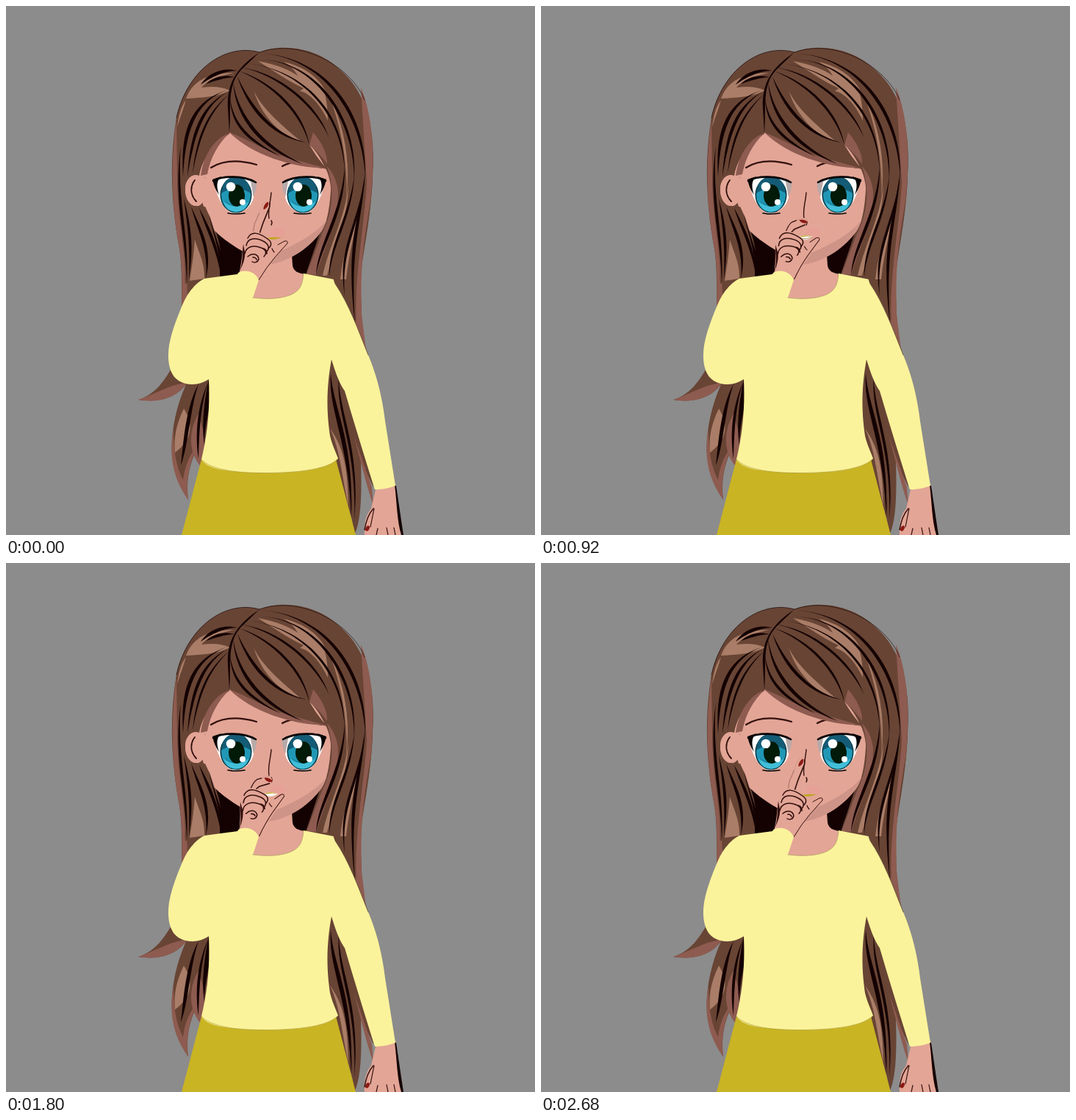
These frames come from a looping animation (720x720 px, 3 s). An HTML page:

```html
<!DOCTYPE html>
<html lang="en">
<head>
<meta charset="utf-8">
<title>Finger bend</title>
<style>
html, body { margin: 0; width: 100%; height: 100%; overflow: hidden; background: #8c8c8c; }
svg { display: block; width: 100vw; height: 100vh; }
</style>
</head>
<body>
<svg id="stage" viewBox="0 0 720 720"></svg>
<script>
const C = {
  hair: '#684434', dark: '#140203', light: '#a97d67', rose: '#8e5b50',
  skin: '#e3a596', shade: '#cf9488', line: '#32100d', top: '#fbf39b',
  skirt: '#c9b423', nail: '#8b1a14', lip: '#bfa51f'
};
const stage = document.getElementById('stage');

function add(tag, attrs, parent = stage) {
  const el = document.createElementNS('http://www.w3.org/2000/svg', tag);
  for (const key in attrs) el.setAttribute(key, attrs[key]);
  parent.appendChild(el);
  return el;
}
const fill = (d, color, parent) => add('path', { d, fill: color }, parent);
const stroke = (d, width, color = C.line, parent) => add('path', {
  d, fill: 'none', stroke: color, 'stroke-width': width,
  'stroke-linecap': 'round', 'stroke-linejoin': 'round'
}, parent);
const oval = (cx, cy, rx, ry, color, parent) =>
  add('ellipse', { cx, cy, rx, ry, fill: color }, parent);

// Tapered lock: one cubic there, a shifted cubic back.
function lock(x1, y1, x2, y2, x3, y3, x4, y4, w, color = C.dark, v = 0) {
  fill(`M${x1} ${y1}C${x2} ${y2} ${x3} ${y3} ${x4} ${y4}` +
    `C${x3 + w} ${y3 + v} ${x2 + w} ${y2 + v} ${x1} ${y1}Z`, color);
}

function backHair() {
  fill('M345 63C300 50 245 88 232 152C222 210 225 270 235 325C240 350 239 380 239 410' +
    'L228 488C215 512 202 529 180 536C205 540 230 535 245 515C228 553 223 592 227 620' +
    'C231 642 239 658 248 672C245 645 249 628 258 606L272 630L450 630L471 700' +
    'L474 720C481 706 485 680 483 620L500 655L497 500C483 453 480 405 482 372' +
    'C487 325 498 285 499 225C501 155 480 95 430 69C400 54 367 54 345 63Z', C.hair);
  fill('M234 148C223 210 225 275 236 330C241 360 239 390 239 412L247 395C247 345 232 295 231 245Z', C.rose);
  fill('M483 112C503 160 501 230 496 270C488 320 482 350 483 400C483 440 491 475 500 502' +
    'L476 432C471 370 488 300 491 240C493 190 490 140 483 112Z', C.rose);
  fill('M180 536C203 528 220 517 239 514L250 508C235 533 209 541 180 536Z', C.rose);
  fill('M228 575C220 615 230 648 248 672C244 645 250 625 259 600C243 620 242 641 241 645C231 625 228 605 228 575Z', C.rose);
  fill('M262 555C247 580 249 610 266 628L272 590Z', C.rose);
  lock(242, 548, 231, 570, 228, 590, 230, 608, 25, C.light);
  lock(262, 515, 244, 545, 241, 600, 238, 625, 7);
  lock(275, 512, 258, 550, 258, 590, 262, 616, 5);
  fill('M276 508L277 545C271 573 269 590 271 602C265 575 270 535 276 508Z', C.dark);
  fill('M473 584L498 655L500 680C488 645 482 615 473 584Z', C.rose);
  lock(442, 500, 438, 550, 466, 590, 470, 695, 8);
  lock(453, 505, 448, 555, 478, 600, 474, 700, 5);
  lock(441, 575, 455, 605, 457, 640, 466, 680, 8, C.light);
  fill('M284 303L328 335L320 368L294 370C294 340 291 320 284 303Z', C.dark);
  fill('M388 342L428 306L408 366L388 361Z', C.dark);
}

function face() {
  fill('M344 335L389 338L390 353C391 361 398 364 407 365L402 404L334 404Z', C.skin);
  fill('M304 170C280 186 266 204 262 232C263 262 274 292 284 306C300 322 326 338 358 351' +
    'C388 347 417 323 429 307C441 291 443 250 443 215L415 185Z', C.skin);
  fill('M437 291C418 314 388 327 368 336L357 352C388 348 416 326 429 307Z', C.shade);
  oval(258, 251, 15, 22, C.skin);
  oval(269, 250, 9, 18, C.skin);
  stroke('M257 236C250 246 251 258 259 266', 1.8);
  stroke('M270 233C272 236 273 239 273 241', .8, C.rose);
  stroke('M279 220C297 209 320 210 341 216', 2.3);
  stroke('M376 218C392 209 412 212 429 220', 2.3);
  stroke('M361 254C360 268 356 276 358 289', 1.4);
  stroke('M361 292Q363 295 361 298', 1.4);
  add('ellipse', { cx: 370, cy: 309, rx: 10, ry: 7, fill: '#e89e94', opacity: .7 });
}

function eye(cx, flip) {
  const g = add('g', { transform: `translate(${cx} 257) scale(${flip} 1)` });
  fill('M4 -20C18 -24 25 -20 28 -17C29 -8 25 1 20 8Z', '#b8a9a9', g);
  fill('M-30 -19C-22 -24 8 -26 20 -18L24 4C20 18 9 25 -4 25C-16 22 -26 5 -30 -19Z', '#fff', g);
  oval(0, 0, 21.5, 24.5, '#07313b', g);
  oval(0, .5, 20, 23, '#2097b5', g);
  fill('M-20 -2C-18 -20 -10 -24 0 -24C12 -24 20 -15 20 -2C10 -10 -9 -10 -20 -2Z', '#145b75', g);
  fill('M-17 9C-8 18 9 18 17 9C13 28 -12 28 -17 9Z', '#42bed8', g);
  stroke('M-14 9C-7 17 7 17 14 9', 1, '#187792', g);
  stroke('M-31 -19C-20 -26 10 -27 27 -17', 2.6, '#050304', g);
  fill('M-32 -21L-20 -25L-24 -20C-27 -13 -25 -6 -23 0C-28 -7 -30 -13 -32 -21Z', '#050304', g);
  stroke('M-11 25Q0 27 12 25', 1.7, '#050304', g);
  oval(cx + 1, 258, 11, 15, '#021a08');
  oval(cx - 7, 246, 6.3, 6.3, '#fff');
  oval(cx + 9, 267, 4, 4, '#fff');
}

function frontHair() {
  // left side
  fill('M345 63C300 50 247 85 232 152C225 205 227 280 239 330L244 378L297 370' +
    'C294 342 288 318 278 288L271 273C253 276 243 262 244 247C245 234 255 228 263 231' +
    'C267 207 284 187 304 174L309 100Z', C.hair);
  oval(258, 251, 14, 21, C.skin);
  oval(268, 250, 8, 17, C.skin);
  stroke('M257 237C250 246 251 258 259 266', 1.8);
  fill('M304 173C281 181 268 207 265 231L274 229C278 207 288 188 304 173Z', C.rose);
  fill('M232 155C224 210 226 275 237 330L243 375C247 345 233 290 233 235Z', C.rose);
  fill('M245 126C253 103 274 91 310 91C288 96 272 103 266 111C282 109 294 110 305 115' +
    'C288 124 264 125 245 126Z', C.light);
  fill('M257 318C255 345 252 360 250 374L270 371C271 350 262 335 257 318Z', C.light);
  fill('M245 128C237 138 234 155 233 165C237 151 242 139 245 128Z', C.light);
  lock(315, 88, 292, 82, 273, 94, 265, 107, 2, C.dark, 6);
  lock(311, 97, 295, 92, 280, 98, 272, 106, 2, C.dark, 5);
  lock(302, 114, 250, 130, 237, 172, 241, 232, 7);
  lock(302, 117, 264, 135, 250, 175, 247, 232, 6);
  lock(304, 120, 272, 145, 259, 180, 254, 228, 4);
  lock(238, 190, 227, 265, 245, 310, 246, 378, 5);
  lock(242, 262, 247, 300, 251, 325, 249, 372, 5);
  lock(252, 273, 260, 305, 276, 330, 272, 371, 6);
  lock(263, 275, 270, 300, 287, 330, 293, 370, 6);
  fill('M276 283C285 318 297 335 297 369L291 369C293 335 282 313 276 283Z', C.dark);

  // right side and fringe
  fill('M345 63C375 52 420 58 450 83C492 115 503 170 499 229C497 285 487 320 482 370' +
    'L485 445L447 373L408 366C419 332 431 310 440 283C445 256 443 235 433 217' +
    'C426 203 418 193 413 189C422 204 429 213 437 222C390 215 340 201 304 172' +
    'C300 125 309 91 345 63Z', C.hair);
  fill('M304 172C333 183 365 204 400 211L436 221C388 220 334 202 304 172Z', C.rose);
  fill('M418 172C430 186 438 202 437 215C430 205 423 198 413 189Z', C.rose);
  fill('M437 218C448 250 444 283 430 310L409 365L422 366C434 326 453 292 452 252C450 237 445 227 437 218Z', C.rose);
  fill('M483 111C504 160 500 230 496 265C487 320 482 350 484 420L489 460L477 435C473 370 488 300 491 240Z', C.rose);
  fill('M343 75C367 79 386 87 397 95C393 87 386 80 378 76C405 82 430 98 439 125L434 120' +
    'C437 132 438 143 438 156C427 132 411 117 400 116L405 112C385 103 364 88 343 75Z', C.light);
  fill('M337 115C347 136 365 154 400 183C384 181 351 159 337 115Z', C.light);
  fill('M441 125C462 166 470 220 462 268C468 225 456 164 441 125Z', C.light);
  fill('M485 262C472 298 459 334 455 372L463 372C467 333 477 298 485 262Z', C.light);
  fill('M466 243C463 285 440 325 431 367L437 367C446 333 466 287 466 243Z', C.light);
  lock(343, 64, 440, 68, 492, 150, 489, 232, -7);
  lock(489, 225, 485, 295, 468, 325, 475, 433, -6);
  lock(336, 73, 420, 68, 481, 150, 474, 238, -6);
  lock(474, 232, 471, 289, 443, 326, 440, 369, -5);
  lock(329, 78, 408, 88, 460, 145, 461, 222, -5);
  lock(461, 218, 463, 281, 430, 324, 422, 366, -6);
  lock(488, 238, 479, 308, 456, 331, 461, 395, -5);
  lock(322, 84, 375, 92, 426, 136, 440, 180, -4, C.dark, 2);
  lock(318, 89, 366, 104, 407, 146, 413, 190, -4, C.dark, 2);
  lock(315, 96, 330, 129, 360, 174, 409, 186, -4, C.dark, 4);
  lock(309, 103, 316, 150, 352, 191, 404, 215, -4, C.dark, 5);
  lock(305, 125, 309, 158, 329, 180, 374, 205, -3, C.dark, 4);
  fill('M345 63C319 81 300 100 302 139L304 173C307 137 300 109 320 87Z', C.dark);
  stroke('M345 63C300 50 247 85 232 152', .6, C.dark);
  stroke('M345 63C400 43 470 82 488 128', .6, C.dark);
}

function clothes() {
  fill('M505 650L497 684C489 694 487 706 488 720L540 720L530 650Z', C.skin);
  stroke('M500 684Q491 694 488 713', 1.5);
  stroke('M501 684L496 709', 1.2);
  fill('M529 652L531 653C535 680 538 700 541 720L538 720C532 700 532 675 529 652Z', C.dark);
  stroke('M506 711L504 720M518 710L520 720M528 710L530 720', 1.2);
  add('ellipse', { cx: 492, cy: 711, rx: 2.5, ry: 4, fill: C.nail, transform: 'rotate(28 492 711)' });
  fill('M266 617L239 720L476 720L449 617Z', C.skirt);
  fill('M270 371L315 365C317 360 327 360 333 362C338 364 343 369 344 373L336 397' +
    'C358 400 378 398 390 392C402 386 404 376 405 364L446 372L448 378C467 406 479 440 493 475' +
    'C507 508 513 540 516 565L530 653Q517 658 502 658C490 620 474 568 461 524' +
    'C452 511 447 494 443 481C434 530 438 563 441 585C444 598 449 607 452 616' +
    'C444 624 430 629 412 632C370 638 322 636 292 631C278 628 269 623 266 617' +
    'C274 585 278 545 276 508C262 517 247 517 235 510C222 502 219 482 222 462' +
    'C226 440 234 422 240 407C247 390 257 378 270 371Z', C.top);
  stroke('M336 397C358 400 378 398 390 392C402 386 404 376 405 364', .7, '#ad9a65');
  stroke('M266 617C280 633 320 636 360 635.500C400 635 440 630 452 616', .7, '#aa9a35');
  stroke('M446 372L448 378C467 406 479 440 493 475', .8, '#5e4935');
}

backHair();
face();
eye(313, 1);
eye(404, -1);
frontHair();

const teeth = fill('', '#fff');
const lips = fill('', C.lip);
const biteLine = stroke('M349 316Q359 318 369 315', .8, '#5a4510');

const fingerEdge = stroke('', 11, C.rose);
const fingerSkin = stroke('', 10, C.skin);
const fingerLine = stroke('', 1.6);
const fingerTop = stroke('', 1.2);
const nail = fill('M-6 0C-3 -3 3 -3 6 -1C4 3 -3 3 -6 0Z', C.nail);

const hand = add('g', {});
fill('M315 374C319 358 321 346 322 330C326 321 328 312 333 308C341 304 350 311 357 316' +
  'C362 321 362 327 359 334L376 321C381 318 385 320 383 324L366 343C356 354 350 366 343 378Z', C.skin, hand);
fill('M323 324C321 338 323 348 318 361C323 351 326 342 325 335Z', C.line, hand);
stroke('M329 316C334 306 344 308 356 317C362 321 362 326 357 330', 1.5, C.line, hand);
stroke('M327 326C329 315 340 315 350 320C358 324 359 330 355 334', 1.5, C.line, hand);
stroke('M325 337C327 327 337 325 347 329C355 332 355 337 351 341', 1.5, C.line, hand);
stroke('M329 341C336 335 343 338 344 344C343 349 338 350 335 348', 1.5, C.line, hand);
stroke('M336 342Q340 342 341 345M350 330Q355 331 355 337', 1.7, C.line, hand);
stroke('M362 330Q363 333 365 335', 1.2, C.line, hand);
stroke('M370 325L379 320Q384 319 383 323L366 342Q354 356 344 373', 1, C.line, hand);

clothes();

const mix = (a, b, k) => a + (b - a) * k;
const clamp = v => Math.max(0, Math.min(1, v));
const STEP = 40, LOOP = 3000, END = 2680, HALF = END / 4;

function draw(ms) {
  const t = Math.min(Math.floor((ms % LOOP) / STEP) * STEP, END);
  const u = (t / HALF) % 2;
  const k = 1 - Math.abs(1 - u); // 0 straight, 1 curled

  hand.setAttribute('transform', `rotate(${-8.5 * k} 330 365)`);

  const bx = mix(340, 334, k), by = mix(313, 309, k);
  const px = mix(345, 342, k), py = mix(294, 302, k);
  const tx = mix(354, 356, k) + 2 * Math.sin(Math.PI * k);
  const ty = mix(272, 306, k);
  const bone = `M${bx} ${by}Q${px - 2} ${py + 4} ${px} ${py}L${tx} ${ty}`;
  fingerSkin.setAttribute('d', bone);
  fingerEdge.setAttribute('d', bone);
  fingerEdge.setAttribute('opacity', .3);

  const len = Math.hypot(tx - px, ty - py) || 1;
  const nx = -(ty - py) / len * 5, ny = (tx - px) / len * 5;
  fingerLine.setAttribute('d',
    `M${bx + 5} ${by - 3}L${px + nx} ${py + ny}L${tx + nx} ${ty + ny}` +
    (k < .3 ? `L${tx + 5} ${ty - 4}` : ''));
  fingerTop.setAttribute('d',
    `M${bx - 4} ${by}Q${px - 7} ${py - 1} ${px - nx} ${py - ny}` +
    `L${mix(px, tx, .45) - nx} ${mix(py, ty, .45) - ny}`);
  fingerTop.setAttribute('opacity', clamp(.25 + k * 1.5));
  nail.setAttribute('transform', `translate(${tx} ${ty}) rotate(${mix(-55, 63, k)})`);

  const open = clamp((t - 360) / 240) * clamp((2600 - t) / 200);
  const lo = mix(318, 321, open), left = mix(354, 348, open), right = mix(375, 370, open);
  teeth.setAttribute('d', `M${left} 315Q359 310 ${right} 314Q361 ${lo} ${left} 315Z`);
  teeth.setAttribute('opacity', open);
  const inner = mix(320, 311.5, open);
  lips.setAttribute('d', `M${left} 316Q361 ${mix(314, 309, open)} ${right} 315Q363 ${inner} ${left} 316Z`);
  biteLine.setAttribute('opacity', open * clamp(Math.abs(t - 1500) / 500 - .5));
}

const start = performance.now();
function tick() {
  draw(performance.now() - start);
  requestAnimationFrame(tick);
}
draw(0);
requestAnimationFrame(tick);
</script>
</body>
</html>
```
